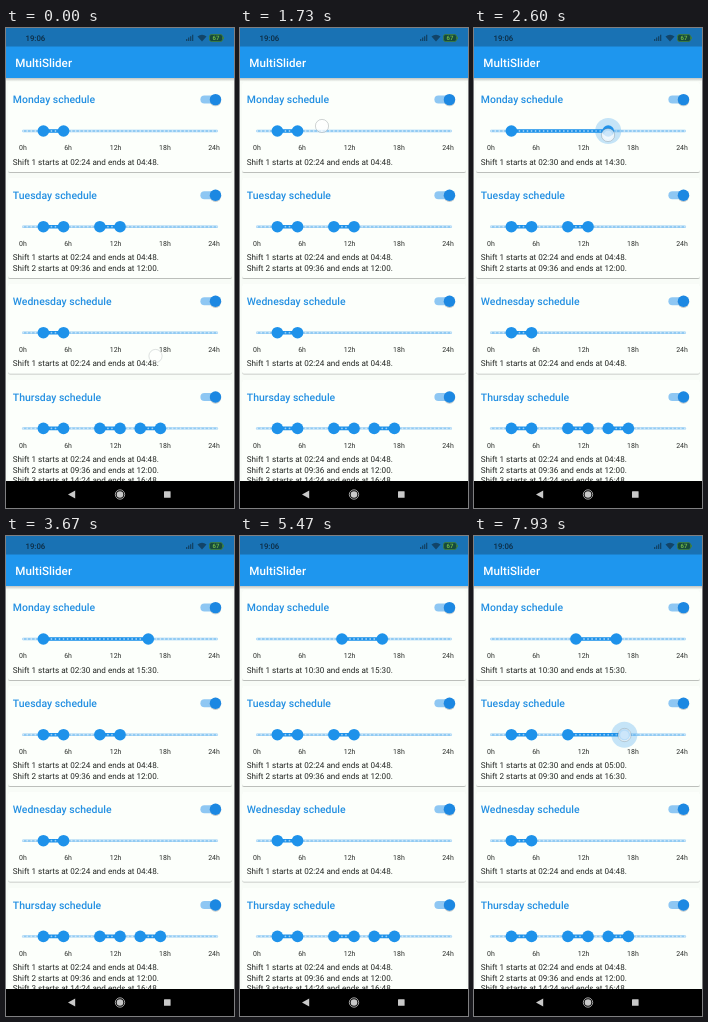
Animation, 228 px wide and 480 px high, one loop 8 s. Source, as an HTML page:

```html
<!DOCTYPE html>
<html lang="en">
<head>
<meta charset="utf-8">
<title>MultiSlider</title>
<style>
  html, body { margin: 0; width: 100%; height: 100%; overflow: hidden; background: #000; }
  svg {
    display: block; width: 228px; height: 480px;
    font-family: Roboto, "Liberation Sans", sans-serif;
    text-rendering: geometricPrecision;
  }
  .day { font-size: 10.45px; font-weight: 500; fill: #2490e2; }
  .hour { font-size: 6.96px; fill: #2c2f2c; }
  .shift { font-size: 8.12px; fill: #222522; }
</style>
</head>
<body>
<svg id="stage" viewBox="0 0 228 480">
  <defs>
    <filter id="shadow" x="-10%" y="-10%" width="120%" height="125%">
      <feDropShadow dx="0" dy=".8" stdDeviation=".7" flood-color="#000" flood-opacity=".3"/>
    </filter>
    <filter id="knob" x="-40%" y="-40%" width="180%" height="180%">
      <feDropShadow dx="0" dy=".7" stdDeviation=".7" flood-color="#000" flood-opacity=".3"/>
    </filter>
    <linearGradient id="barShade" x1="0" y1="0" x2="0" y2="1">
      <stop offset="0" stop-color="#000" stop-opacity=".22"/>
      <stop offset="1" stop-color="#000" stop-opacity="0"/>
    </linearGradient>
  </defs>
  <rect width="228" height="480" fill="#f8fcf7"/>
  <g id="cards"></g>

  <rect y="50" width="228" height="3.5" fill="url(#barShade)"/>
  <rect width="228" height="50" fill="#1e96ee"/>
  <rect width="228" height="18.5" fill="#1972b4"/>
  <text x="9.3" y="39" font-size="11.6" font-weight="500" letter-spacing=".05" fill="#fff">MultiSlider</text>
  <text x="19.5" y="13" font-size="7.8" font-weight="500" fill="#0d2c43">19:06</text>
  <g fill="#124468">
    <path d="M180 11h1.3v2H180zM182 9.6h1.3v3.4H182zM184 8.2h1.3V13H184zM186 6.8h1.3V13H186z"/>
    <path d="M191.5 8.6Q196 5 200.5 8.6L196 13.6z"/>
  </g>
  <rect x="203.5" y="6.500" width="13" height="7" rx="2" fill="#174a3c" stroke="#41803c" stroke-width=".8"/>
  <text x="210" y="12.2" font-size="6" font-weight="700" text-anchor="middle" fill="#6cb548">67</text>
  <path d="M216.9 8.7h1v2.6h-1z" fill="#41803c"/>

  <rect y="453" width="228" height="27" fill="#000"/>
  <g fill="#c9c9c9">
    <path d="M62 466.500L69.200 462.500V470.500z"/>
    <circle cx="114" cy="466.500" r="3.300"/>
    <circle cx="114" cy="466.500" r="4.700" fill="none" stroke="#c9c9c9" stroke-width=".8"/>
    <rect x="158" y="463.200" width="6.600" height="6.600" rx=".5"/>
  </g>

  <g id="touch">
    <circle r="6.600" fill="#fff" fill-opacity=".68" stroke="#5f6a70" stroke-opacity=".32" stroke-width=".9"/>
    <circle r="4.300" fill="#fff" fill-opacity=".3"/>
  </g>
</svg>
<script>
const LOOP = 8000, BLUE = '#1e92ea', GREY = '#9c9f9d';
const LINE = 10.4;

const days = [
  { name: 'Monday', y: 0, hours: [2.4, 4.8] },
  { name: 'Tuesday', y: 95.7, hours: [2.4, 4.8, 9.6, 12] },
  { name: 'Wednesday', y: 201.7, hours: [2.4, 4.8] },
  { name: 'Thursday', y: 297.4, hours: [2.4, 4.8, 9.6, 12, 14.4, 16.8] },
];

// keys: [time, hour]
const drags = [
  { day: 0, thumb: 1, end: 3050, keys: [[1850, 8], [2600, 14.5], [2900, 15.5]] },
  { day: 0, thumb: 0, end: 5120, keys: [[3980, 2.5], [4670, 9], [5000, 10.5]] },
  { day: 1, thumb: 3, end: 8000, keys: [[7560, 12], [7930, 16.5]] },
];

// keys: [time, x, y]
const touches = [
  { from: -500, to: -60, keys: [[0, 149.5, 328]] },
  { from: 1690, to: 3050, keys: [[1780, 82, 98], [2600, 134, 107], [2900, 142, 107]] },
  { from: 3820, to: 5120, keys: [[3960, 38, 98], [4670, 91, 98], [5000, 102, 98]] },
  { from: 5560, to: 5680, keys: [[0, 204, 71.5]] },
  { from: 6400, to: 6500, keys: [[0, 204, 71.5]] },
  { from: 7400, to: 8100, keys: [[7540, 114, 199], [7930, 150.5, 199]] },
];
const OFF = 5680, ON = 6500, FADE = 200;

const clamp = v => Math.max(0, Math.min(1, v));
const ease = v => v * v * (3 - 2 * v);
const mix = (a, b, p) => a + (b - a) * p;
const snap = h => Math.round(h * 2) / 2;
const xOf = h => 17.2 + 8.07 * h;
const rgb = (a, b, p) => `rgb(${a.map((v, i) => Math.round(mix(v, b[i], p)))})`;

function track(keys, t, i = 1) {
  if (t <= keys[0][0]) return keys[0][i];
  for (let k = 1; k < keys.length; k++) {
    const a = keys[k - 1], b = keys[k];
    if (t < b[0]) return mix(a[i], b[i], (t - a[0]) / (b[0] - a[0]));
  }
  return keys[keys.length - 1][i];
}

function clock(h) {
  const m = Math.round(h * 60), two = n => String(n).padStart(2, '0');
  return two(Math.floor(m / 60)) + ':' + two(m % 60);
}

function add(parent, tag, attrs, text) {
  const el = document.createElementNS('http://www.w3.org/2000/svg', tag);
  set(el, attrs);
  if (text) el.textContent = text;
  return parent.appendChild(el);
}
function set(el, attrs) {
  for (const k in attrs) el.setAttribute(k, attrs[k]);
}

function build(day) {
  const rows = day.hours.length / 2;
  const g = add(document.getElementById('cards'), 'g', { transform: `translate(0 ${day.y})` });
  add(g, 'rect', { x: 2, y: 54, width: 224, height: 79.5 + rows * LINE, rx: 2, fill: '#fcfffb', filter: 'url(#shadow)' });
  add(g, 'text', { x: 6.8, y: 75.4, class: 'day' }, day.name + ' schedule');

  day.rail = add(g, 'rect', { x: 194.4, y: 67.5, width: 19.2, height: 8.1, rx: 4.05 });
  day.knob = add(g, 'circle', { cy: 71.6, r: 5.7, filter: 'url(#knob)' });

  const line = { y1: 103, y2: 103, 'stroke-linecap': 'round' };
  day.base = add(g, 'line', { ...line, x1: xOf(0), x2: xOf(24), 'stroke-width': 2.4, 'stroke-opacity': .48 });
  day.spans = Array.from({ length: rows }, () => add(g, 'line', { ...line, 'stroke-width': 3.6 }));
  for (let i = 0; i <= 48; i++)
    add(g, 'circle', { cx: xOf(i / 2), cy: 103, r: .9, fill: '#fff', 'fill-opacity': .55 });
  day.halo = add(g, 'circle', { cy: 103, r: 13, fill: BLUE, 'fill-opacity': .25 });
  day.thumbs = day.hours.map(() => add(g, 'circle', { cy: 103, r: 5.8 }));

  [[13, '0h'], [58.2, '6h'], [103.8, '12h'], [153.1, '18h'], [202.2, '24h']]
    .forEach(([x, s]) => add(g, 'text', { x, y: 122.4, class: 'hour' }, s));
  day.lines = day.spans.map((_, i) => add(g, 'text', { x: 6.8, y: 136.8 + i * LINE, class: 'shift' }));
}

function drawDay(day, index, t) {
  const hours = day.hours.slice();
  let held = -1, touched = false;
  for (const d of drags) {
    if (d.day !== index || t < d.keys[0][0]) continue;
    touched = true;
    hours[d.thumb] = track(d.keys, t);
    if (t < d.end) held = d.thumb;
  }
  const live = index !== 0 || t < OFF || t >= ON;
  const color = live ? BLUE : GREY;
  const xs = hours.map(h => xOf(snap(h)));
  const shown = touched ? hours.map(snap) : hours;

  day.base.setAttribute('stroke', color);
  day.thumbs.forEach((c, i) => set(c, { cx: xs[i], fill: color }));
  day.spans.forEach((l, i) => set(l, { x1: xs[2 * i], x2: xs[2 * i + 1], stroke: color }));
  day.lines.forEach((el, i) => {
    el.textContent = `Shift ${i + 1} starts at ${clock(shown[2 * i])} and ends at ${clock(shown[2 * i + 1])}.`;
  });
  set(day.halo, { cx: held < 0 ? 0 : xs[held], visibility: held < 0 ? 'hidden' : 'visible' });

  const p = index ? 1 : t < ON ? 1 - ease(clamp((t - OFF) / 200)) : ease(clamp((t - ON) / 200));
  set(day.knob, { cx: mix(198.5, 209.5, p), fill: rgb([250, 250, 250], [30, 136, 226], p) });
  day.rail.setAttribute('fill', rgb([130, 134, 136], [142, 199, 243], p));
}

function drawTouch(t) {
  const el = document.getElementById('touch');
  const hit = touches.find(s => t >= s.from && t < s.to + FADE);
  if (!hit) return el.setAttribute('opacity', 0);
  set(el, {
    opacity: 1 - clamp((t - hit.to) / FADE),
    transform: `translate(${track(hit.keys, t, 1)} ${track(hit.keys, t, 2)})`,
  });
}

function render(t) {
  days.forEach((day, i) => drawDay(day, i, t));
  drawTouch(t);
}

days.forEach(build);
render(0);
const start = performance.now();
function tick() {
  render((performance.now() - start) % LOOP);
  requestAnimationFrame(tick);
}
requestAnimationFrame(tick);
</script>
</body>
</html>
```
